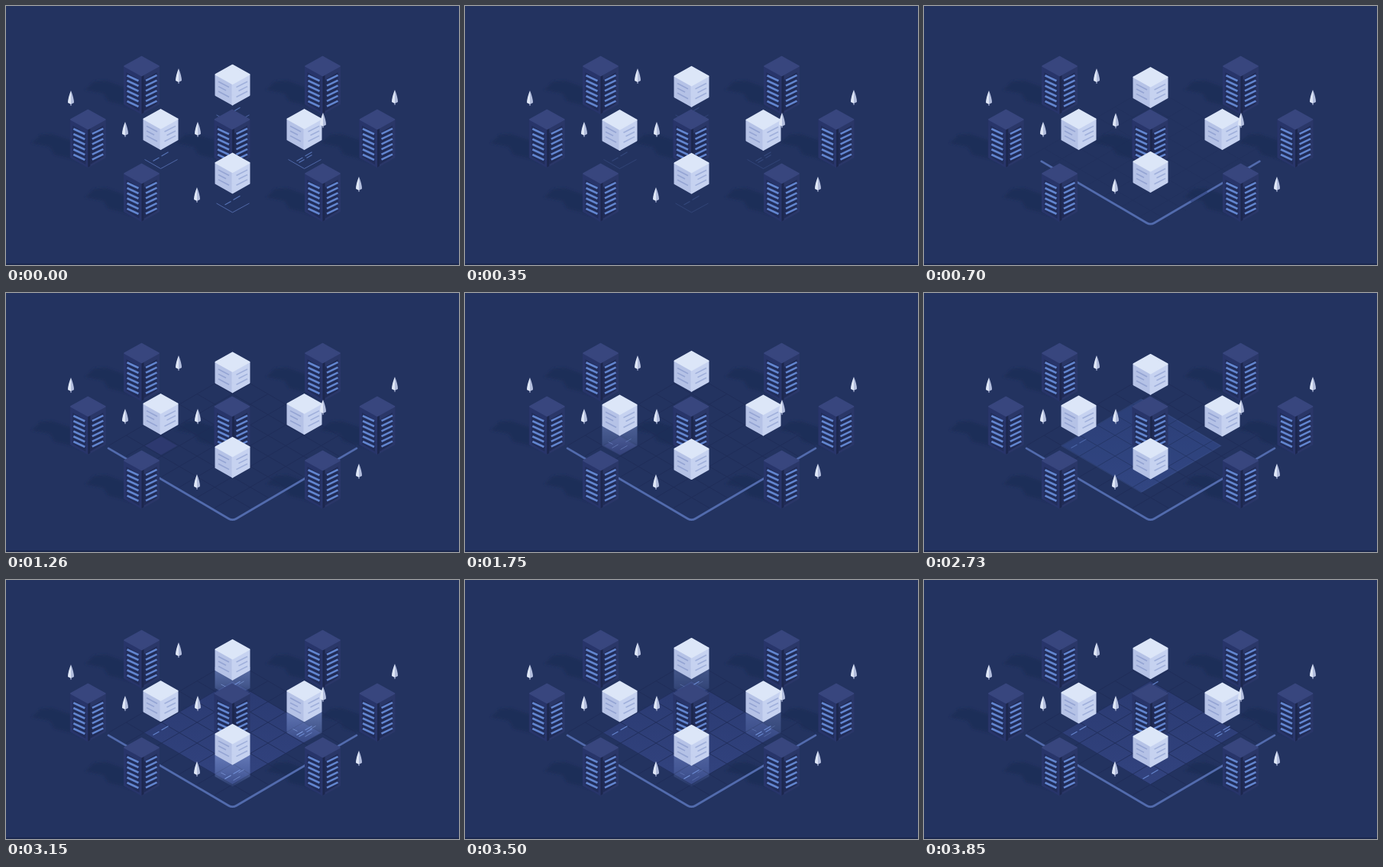
Write an HTML page that moves like this. It is 593 by 340 pixels and loops after 3920 ms.

```html
<!DOCTYPE html>
<html lang="en">
<head>
<meta charset="utf-8">
<title>Isometric network</title>
<style>
html, body { margin: 0; width: 100%; height: 100%; overflow: hidden; background: #233360; }
svg { display: block; width: 593px; height: 340px; }
</style>
</head>
<body>
<svg id="stage" viewBox="0 0 593 340" xmlns="http://www.w3.org/2000/svg">
  <defs>
    <linearGradient id="beam" x1="0" y1="0" x2="0" y2="1">
      <stop offset="0" stop-color="#8fa6e6" stop-opacity=".55"/>
      <stop offset=".55" stop-color="#7f98dc" stop-opacity=".38"/>
      <stop offset="1" stop-color="#6d86cc" stop-opacity=".14"/>
    </linearGradient>
    <linearGradient id="floor" x1="0" y1="0" x2="0" y2="1">
      <stop offset="0" stop-color="#2a3a71"/>
      <stop offset="1" stop-color="#32437f"/>
    </linearGradient>
    <filter id="soft" x="-20%" y="-20%" width="140%" height="140%">
      <feGaussianBlur stdDeviation="1.6"/>
    </filter>
  </defs>
</svg>
<script>
const LOOP = 3920, STEP = 70;
const HW = 23.2, HH = 13.6;          // half size of one floor cell
const CX = 296.5, CY = 200.5;        // centre of the floor
const svg = document.getElementById('stage');

function add(parent, tag, attrs) {
  const el = document.createElementNS('http://www.w3.org/2000/svg', tag);
  for (const k in attrs) el.setAttribute(k, attrs[k]);
  parent.appendChild(el);
  return el;
}
const group = (parent, attrs) => add(parent, 'g', attrs || {});
const poly = (parent, points, fill, extra) =>
  add(parent, 'polygon', { points, fill, ...extra });
const line = (parent, x1, y1, x2, y2, stroke, width, extra) =>
  add(parent, 'line', { x1, y1, x2, y2, stroke, 'stroke-width': width, ...extra });
const diamond = (x, y, w, h) => `${x},${y - h} ${x + w},${y} ${x},${y + h} ${x - w},${y}`;
const clamp = v => Math.max(0, Math.min(1, v));
const ramp = (t, a, b) => clamp((t - a) / (b - a));
const easeOut = p => 1 - (1 - p) ** 2;
const easeInOut = p => p * p * (3 - 2 * p);
const set = (el, name, v) => el.setAttribute(name, v);

add(svg, 'rect', { width: 593, height: 340, fill: '#233360' });
add(svg, 'rect', { y: 338, width: 593, height: 2, fill: '#1b284e' });

const towers = [[177.5, 66], [414.5, 66], [107.3, 136], [296, 136], [486, 136], [177.5, 207], [414.5, 207]];

// ground shadows
const shade = group(svg, { filter: 'url(#soft)' });
for (const [x, y] of towers)
  poly(shade, `${x - 74},${y + 44} ${x - 62},${y + 33} ${x - 47},${y + 32} ${x},${y + 48} ` +
    `${x},${y + 72} ${x - 24},${y + 64} ${x - 44},${y + 59} ${x - 50},${y + 49}`, '#1f2d58');

// floor
const floor = poly(svg, '', 'url(#floor)');
const grid = group(svg);
for (let i = -3; i <= 3; i++) {
  const d = i - .5, o = 3.5;
  const at = (u, v) => [CX + (u - v) * HW, CY + (u + v) * HH];
  line(grid, ...at(d, -o), ...at(d, o), '#1f2c57', 1);
  line(grid, ...at(-o, d), ...at(o, d), '#1f2c57', 1);
}
const tile = poly(svg, diamond(203, 200.5, 21, 12), '#2d396f');
const patch = poly(svg, '', '#32528f', { stroke: '#587ac2', 'stroke-width': 1.2 });
const cross = line(svg, 194, 207, 216, 194, '#5f82c8', 1);
const rim = add(svg, 'path', {
  fill: 'none', stroke: '#526bad', 'stroke-width': 2.8,
  'stroke-linecap': 'round', 'stroke-linejoin': 'round'
});
const notch = line(svg, 0, 0, 0, 0, '#354985', 3);

// cell marks and light beams
const cells = [[296.5, 142], [202.5, 200.5], [390.5, 200.5], [296.5, 258]];
const marks = cells.map(([x, y]) => {
  const g = group(svg);
  const edge = add(g, 'path', {
    d: `M${x - 21},${y + 1}L${x},${y + 13}L${x + 22},${y + 1}`,
    fill: 'none', stroke: '#5068a8', 'stroke-width': 1
  });
  const dashes = group(g, { stroke: '#6484cc', 'stroke-width': 1.2 });
  add(dashes, 'path', { d: `M${x - 10},${y + 3}l8,-4.6M${x + 1},${y - 3.5}l9,-5.2` });
  if (x > 380) add(dashes, 'path', { d: `M${x - 7},${y + 5}l7,-4M${x + 3},${y - 1}l7,-4` });
  return { edge, dashes };
});
const beams = cells.map(([x, y]) => {
  const g = group(svg);
  poly(g, `${x - 23},${y - 28} ${x + 23},${y - 28} ${x + 23},${y} ${x},${y + 13} ${x - 23},${y}`, 'url(#beam)');
  add(g, 'path', {
    d: `M${x - 10},${y + 3}l8,-4.6M${x + 1},${y + 5}l9,-5.2M${x - 15},${y - 5}l6,3M${x + 8},${y - 5}l7,-4`,
    stroke: '#88a4e4', 'stroke-width': 1, opacity: .6
  });
  return g;
});

function tower([x, y]) {
  const g = group(svg, { transform: `translate(${x} ${y})` });
  const left = '-23,13 0,26 0,76 -23,63', right = '23,13 0,26 0,76 23,63';
  poly(g, left, '#28356a', { stroke: '#28356a', 'stroke-linejoin': 'round' });
  poly(g, right, '#2a3768', { stroke: '#2a3768', 'stroke-linejoin': 'round' });
  poly(g, '-20,21 -3,31 -3,72 -20,62', '#212d5a');
  poly(g, '20,21 3,31 3,72 20,62', '#202b56');
  poly(g, '0,26 3,25 3,74 0,76', '#1c274e');
  poly(g, diamond(0, 13, 22.5, 12.5), '#38467e', { stroke: '#38467e', 'stroke-width': 1.5, 'stroke-linejoin': 'round' });
  for (let i = 0; i < 6; i++) {
    const s = 25.2 + i * 6.75;
    line(g, -19, s, -4, s + 7, '#6285cf', 2.7);
    line(g, 20, s - .3, 5.5, s + 6.7, '#6285cf', 2.7);
  }
}
towers.forEach(tower);

function tree([x, y]) {
  const g = group(svg);
  line(g, x, y + 6, x, y + 10, '#8793b9', 1.5);
  add(g, 'path', { d: `M${x},${y - 10}Q${x - 4},${y} ${x - 4},${y + 6}L${x},${y + 8}Z`, fill: '#dfe7f7' });
  add(g, 'path', { d: `M${x},${y - 10}Q${x + 4},${y} ${x + 4},${y + 6}L${x},${y + 8}Z`, fill: '#b3bedd' });
  return g;
}

function cube() {
  const g = group(svg);
  const face = (pts, c) => poly(g, pts, c, { stroke: c, 'stroke-width': 2, 'stroke-linejoin': 'round' });
  face('-22,14.5 0,27 0,53.7 -22,41.3', '#b5c2e6');
  face('22,14.5 0,27 0,53.7 22,41.3', '#c6d2f0');
  face(diamond(0, 14.2, 21.9, 12.3), '#dce6f8');
  for (let i = 0; i < 3; i++) {
    const s = 23.5 + i * 6.4;
    line(g, -18.5, s, -4.5 - i % 2 * 4, s + 7.4 - i % 2 * 2.2, '#94a4d3', 1.6);
    line(g, 19.5, s, 5 + i % 2 * 3, s + 7.4 - i % 2 * 1.6, '#a0b0db', 1.6);
  }
  return g;
}
// x, mean top, time of lowest point
const cubes = [[296.5, 77, 690], [202.5, 133.2, 350], [390.5, 133.2, 350], [296.5, 190, 220]]
  .map(([x, y, low]) => ({ x, y, low, el: cube() }));

[[226, 92], [85, 121], [509, 120], [415, 150], [156, 162], [462, 234]].forEach(tree);
const hoppers = [[251, 162], [250, 248]].map(tree);

function draw(t) {
  for (const c of cubes) {
    const dy = 2.1 * Math.cos(2 * Math.PI * (t - c.low) / (LOOP / 2));
    set(c.el, 'transform', `translate(${c.x} ${(c.y + dy).toFixed(2)})`);
  }
  // inner trees hop while the rim spreads
  const hop = -11.5 * Math.sin(Math.PI * ramp(t, 455, 945));
  for (const el of hoppers) set(el, 'transform', `translate(0 ${hop.toFixed(2)})`);

  // outer rim spreads from the inner floor edge
  const n = 5 + 2 * easeOut(ramp(t, 490, 1090));
  const top = CY + 3.4, w = n * HW, h = n * HH, by = top + h;
  const k = 5 / w, ry = h * k;
  set(rim, 'd', `M${CX - w},${top}L${CX - w * k},${by - ry}Q${CX},${by} ${CX + w * k},${by - ry}L${CX + w},${top}`);
  set(rim, 'opacity', ramp(t, 480, 620));
  const q = [.37, .52].map(f => [CX + w * f, by - h * f]);
  ['x1', 'y1', 'x2', 'y2'].forEach((a, i) => set(notch, a, q[i >> 1][i & 1]));
  set(notch, 'opacity', .75 * ramp(t, 480, 620) * (1 - ramp(t, 700, 1260)));
  set(grid, 'opacity', .8 * ramp(t, 480, 1100));

  // first cell lights up, then spreads from its left corner
  set(tile, 'opacity', ramp(t, 1080, 1260) * (1 - ramp(t, 1960, 2240)));
  const size = 1 + 4 * easeInOut(ramp(t, 2240, 2870));
  const shape = diamond(180 + size * HW, CY, size * HW, size * HH);
  set(patch, 'points', shape);
  set(floor, 'points', shape);
  set(patch, 'opacity', .75 * ramp(t, 1960, 2240) * (1 - ramp(t, 2380, 2870)));
  set(cross, 'opacity', ramp(t, 1960, 2240) * (1 - ramp(t, 2380, 2600)));
  set(floor, 'opacity', ramp(t, 2240, 2520));

  const first = ramp(t, 1400, 1680) * (1 - ramp(t, 2030, 2450));
  const rest = ramp(t, 2800, 3080) * (1 - ramp(t, 3360, 3710));
  beams.forEach((b, i) => set(b, 'opacity', i === 1 ? first * .75 : rest));

  const intro = 1 - ramp(t, 70, 480);
  marks.forEach((m, i) => {
    set(m.edge, 'opacity', intro);
    const late = i === 1 ? ramp(t, 2590, 2870) : ramp(t, 2800, 3080);
    set(m.dashes, 'opacity', Math.max(intro * .8, late));
  });
}

function tick() {
  const t = performance.now() % LOOP;
  draw(Math.floor(t / STEP) * STEP);
  requestAnimationFrame(tick);
}
tick();
</script>
</body>
</html>
```
